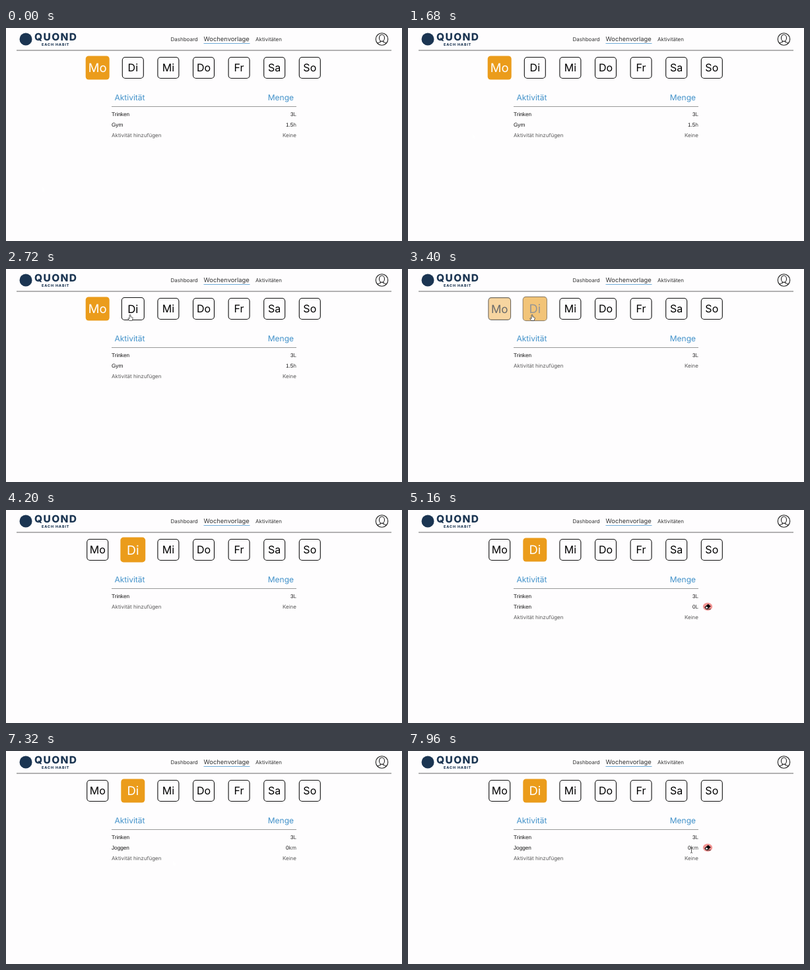
Animation of 600x324 px, one loop 8000 ms. Source, as an HTML page:

```html
<!DOCTYPE html>
<html lang="de">
<head>
<meta charset="utf-8">
<title>Wochenvorlage</title>
<style>
  html, body { margin: 0; width: 100%; height: 100%; overflow: hidden; background: #fefdfe; }
  svg { display: block; width: 600px; height: 324px; font: 8px Inter, sans-serif; text-rendering: geometricPrecision; }
  .field { font: 8.2px "Liberation Sans", Arial, sans-serif; fill: #111; }
  .unit { font: 8px Inter, sans-serif; fill: #444; }
  .muted { fill: #5a5a5a; }
  .end { text-anchor: end; }
  .head { font-size: 12px; fill: #4191c9; }
  .brand { font-weight: 800; fill: #1b3552; }
</style>
</head>
<body>
<svg viewBox="0 0 600 324">
  <defs>
    <g id="eraser">
      <ellipse rx="7.2" ry="6" fill="#f29594"/>
      <path d="M-4.8 1L.8-4 4.8-.6-.6 4H-2.4Z"/>
      <path d="M-3.4 1.1L-1.6-.4.6 1.5-1.1 3H-1.9Z" fill="#fff"/>
      <path d="M-1 3.7H4.6" stroke="#000" stroke-width=".8"/>
    </g>
    <g stroke="#444" stroke-width=".7">
      <path id="arrow" d="M.3 0V7.4L1.8 6 2.8 8.5 3.9 8 2.9 5.6H4.9Z" fill="#fff"/>
    </g>
    <path id="hand" d="M-.9 .5Q0-.8.9.5V3.3L3.6 4Q4.4 4.3 4.2 5.4L3.3 9H-1.2L-3.3 5.9Q-3.1 4.8-2 5.3L-.9 6.2Z" fill="#fff" stroke="#333" stroke-width=".8"/>
    <path id="beam" d="M-1.7-4H-.5L0-3.5.5-4H1.7M0-3.5V3.5M-1.7 4H-.5L0 3.5.5 4H1.7" fill="none" stroke="#333" stroke-width=".8"/>
  </defs>

  <circle cx="30" cy="17" r="9.5" fill="#1b3552"/>
  <text class="brand" x="43" y="18.7" font-size="15.5" letter-spacing="1.4">QUOND</text>
  <text class="brand" x="54" y="27" font-size="5.4" letter-spacing=".9">EACH HABIT</text>

  <g fill="#333">
    <text x="249.5" y="20">Dashboard</text>
    <text x="299.5" y="20.4" font-size="9.4">Wochenvorlage</text>
    <text x="378" y="20">Aktivitäten</text>
  </g>
  <path d="M299.5 23.5H369.5" stroke="#6fabd8"/>
  <path d="M16 34H584" stroke="#666"/>
  <g fill="none" stroke="#222" stroke-width="1.1">
    <circle cx="569.5" cy="17" r="9.2"/>
    <ellipse cx="569.5" cy="15.2" rx="4" ry="5.2"/>
    <path d="M563 23.4Q564 21.9 567.4 21.2V19.6M571.6 19.6V21.2Q575 21.9 576 23.4"/>
  </g>

  <g id="days"></g>

  <text class="head" x="164.5" y="109.8">Aktivität</text>
  <text class="head end" x="436" y="109.8">Menge</text>
  <path d="M160 119.5H440" stroke="#999"/>
  <g id="rows"></g>
  <use id="cursor"/>
</svg>

<script>
const LOOP = 8000, STEP = 40, ROW = 16.2;
const $ = id => document.getElementById(id);
const progress = (t, from, to) => Math.min(1, Math.max(0, (t - from) / (to - from)));
const ease = (t, from, to) => {
  const u = progress(t, from, to);
  return u * u * (3 - 2 * u);
};

// Pointer moves, bowed towards an optional bend point
const start = [55, 241.7];
const moves = [
  { from: 80, to: 160, end: [52.5, 241.7] },
  { from: 960, to: 1800, end: [119, 143], bend: [36, 205] },
  { from: 1800, to: 2640, end: [188, 69.5] },
  { from: 4080, to: 4600, end: [196.5, 146.5], bend: [186, 105] },
  { from: 5440, to: 5640, end: [187.6, 146.5] },
  { from: 5800, to: 5960, end: [186.7, 149.8] },
  { from: 6520, to: 6920, end: [182, 173.5] },
  { from: 7080, to: 7920, end: [429.5, 151] }
];

function pointer(t) {
  return moves.reduce((at, { from, to, end, bend }) => {
    const u = progress(t, from, to), v = 1 - u;
    return at.map((p, k) => {
      const mid = bend ? bend[k] : (p + end[k]) / 2;
      return v * v * p + 2 * u * v * mid + u * u * end[k];
    });
  }, start);
}

function day(name, i, selected, hover) {
  const x = 299.5 + 53.6 * (i - 3), y = 60.5;
  const size = 32 + 4 * selected + 2 * hover, font = 16 + 2.5 * selected + .9 * hover;
  const grey = 255 * selected;
  return `<rect x="${x - size / 2}" y="${y - size / 2}" width="${size}" height="${size}" rx="4.5"
      fill="#eb9c1b" fill-opacity="${selected}" stroke="#111" stroke-width="1.1" stroke-opacity="${1 - selected}"/>
    <text x="${x}" y="${y + font * .364}" text-anchor="middle" font-size="${font}"
      fill="rgb(${grey},${grey},${grey})">${name}</text>`;
}

function row([name, amount, unit], i, active) {
  const y = 133.9 + ROW * i;
  return `<text class="field" x="160" y="${y}">${name}</text>
    <text class="field end" x="440" y="${y}">${amount}<tspan class="unit">${unit}</tspan></text>` +
    (i === active ? `<use href="#eraser" x="454" y="${y - 3}"/>` : '');
}

function activities(t) {
  const list = [['Trinken', '3', 'L']];
  if (t < 3280) list.push(['Gym', '1.5', 'h']);
  else if (t >= 7120) list.push(['Joggen', '0', 'km']);
  else if (t >= 4760) list.push(['Trinken', '0', 'L']);
  return list;
}

function draw(t) {
  const [x, y] = pointer(t);
  const picked = ease(t, 3200, 3560);
  const hover = ease(t, 2480, 2680) - ease(t, 4160, 4400);
  $('days').innerHTML = ['Mo', 'Di', 'Mi', 'Do', 'Fr', 'Sa', 'So'].map((name, i) =>
    day(name, i, [1 - picked, picked][i] || 0, i === 1 ? hover : 0)).join('');

  const list = activities(t);
  const under = x >= 160 ? Math.floor((y - 123) / ROW) : -1;
  const menuOpen = t >= 6000 && t < 7120;
  const addY = 133.9 + ROW * list.length;
  $('rows').innerHTML = list.map((item, i) => row(item, i, menuOpen ? 1 : under)).join('') +
    `<text class="muted" x="160" y="${addY}">Aktivität hinzufügen</text>
     <text class="muted end" x="440" y="${addY}">Keine</text>`;

  const onRow = under >= 0 && under < list.length;
  const onDay = Math.abs(x - 192.3) < 18 && y < 79;
  const shape = onDay || onRow && x < 187.4 ? 'hand' : onRow && x > 415 ? 'beam' : 'arrow';
  $('cursor').setAttribute('href', '#' + shape);
  $('cursor').setAttribute('transform', `translate(${x} ${y})`);
}

function frame() {
  const t = performance.now() % LOOP;
  draw(Math.floor(t / STEP) * STEP);
  requestAnimationFrame(frame);
}
frame();
</script>
</body>
</html>
```
